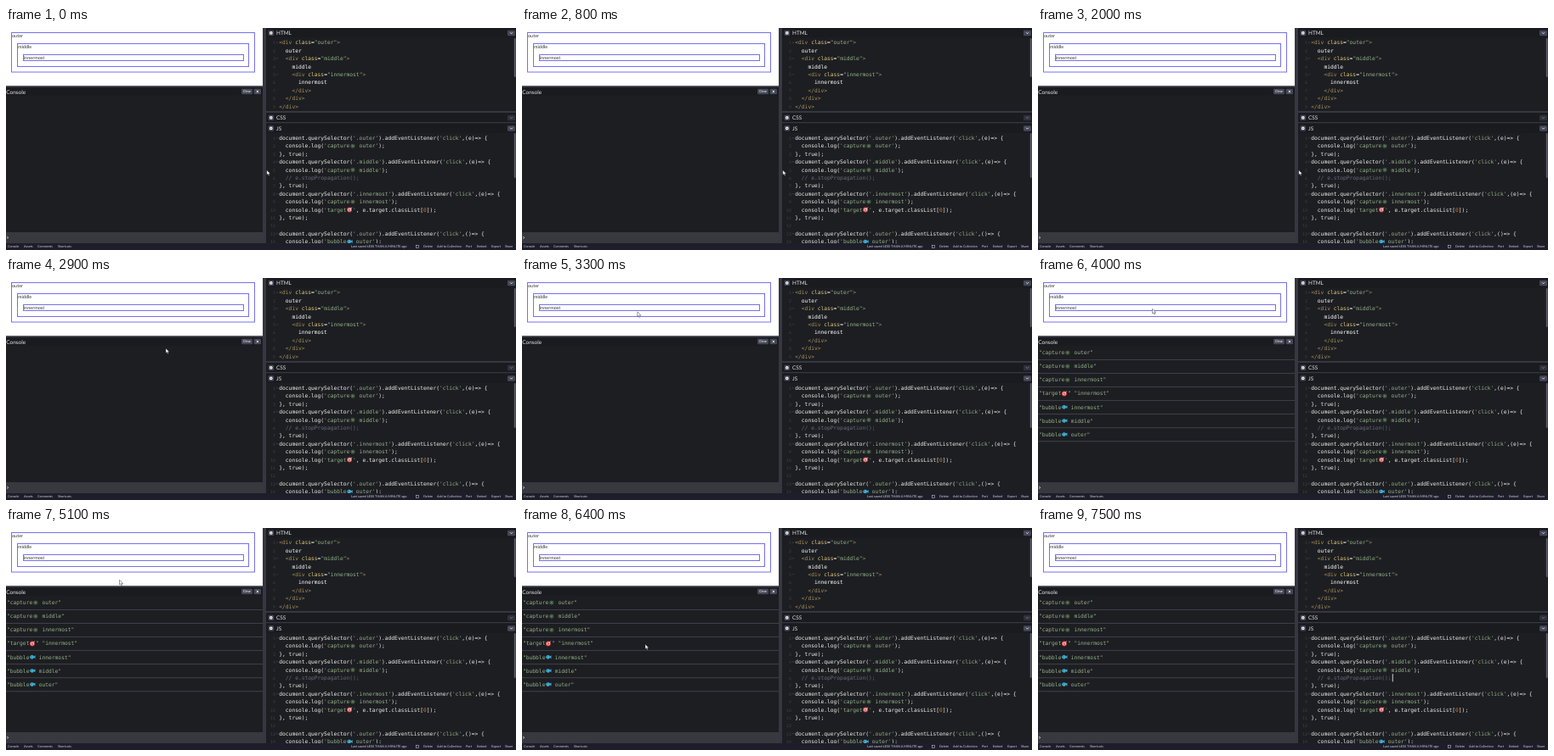
An HTML page that plays this animation: 600x262 px, repeating every 8000 ms.

```html
<!DOCTYPE html>
<html lang="en">
<head>
<meta charset="utf-8">
<title>Event phases</title>
<style>
html, body { margin: 0; width: 100%; height: 100%; overflow: hidden; background: #1d1e22; }
svg { display: block; width: 100%; height: 100%; }
text { white-space: pre; text-rendering: geometricPrecision; font-family: Lato, sans-serif; }
.mono { font: 6.28px "DejaVu Sans Mono", monospace; }
</style>
</head>
<body>
<svg id="stage" viewBox="0 0 600 262"></svg>
<script>
const CH = 3.78, LINE = 9.4, LOOP = 8000;
const BAR = '#363741', BUTTON = '#444857', GREEN = '#96b38a';

const rect = (x, y, w, h, fill, extra = '') =>
  `<rect x="${x}" y="${y}" width="${w}" height="${h}" fill="${fill}" ${extra}/>`;
const label = (x, y, s, size, fill, extra = '') =>
  `<text x="${x}" y="${y}" font-size="${size}" fill="${fill}" ${extra}>${s}</text>`;
const esc = s => s.replace(/&/g, '&amp;').replace(/</g, '&lt;').replace(/>/g, '&gt;');

// Icons two characters wide, keyed by their placeholder.
const icons = {
  '@': '<path d="M3.5-5 4.4-4 5.9-4.3 5.6-2.9 6.6-2 5.5-1.3 5.7.1 4.3-.2 3.5.9 2.7-.2 1.3.1 1.5-1.3.4-2 1.4-2.9 1.1-4.3 2.6-4z" fill="#43583f"/><circle cx="3.5" cy="-2.2" r="1" fill="#67805c"/>',
  '#': '<circle cx="3.4" cy="-2" r="3" fill="#d93a3c"/><circle cx="3.4" cy="-2" r="2" fill="#f0dcd8"/><circle cx="3.4" cy="-2" r="1.2" fill="#d93a3c"/><path d="M3.4-2 6.2-4.9" stroke="#e8eef2" stroke-width=".8"/>',
  '~': '<path d="M.3-2.2Q1.4-4.6 3.6-4.4 4.8-4.1 5.4-3L7-4.2V-.2L5.4-1.4Q4.6.2 3.2.3 1.2.2.3-2.2z" fill="#3fa9cf"/><circle cx="1.8" cy="-2.5" r=".45" fill="#17303c"/>'
};

const TOKEN = /(\/\/.*)|('[^']*'|"[^"]*")|(<\/?div|>$)|(\bclass\b)|(\d)/g;
const COLORS = ['#686b7c', GREEN, '#a7925a', '#ddca7e', '#d0782a'];

function code(x, y, src, plain) {
  const wide = src.replace(/[@#~]/g, '\u00a0\u00a0');
  const span = (s, fill) => s && `<tspan fill="${fill}">${esc(s)}</tspan>`;
  let at = 0, spans = '', icon = '';
  for (const m of wide.matchAll(TOKEN)) {
    spans += span(wide.slice(at, m.index), plain);
    spans += span(m[0], COLORS[m.slice(1).findIndex(Boolean)]);
    at = m.index + m[0].length;
  }
  spans += span(wide.slice(at), plain);
  const i = src.search(/[@#~]/);
  if (i >= 0) icon = `<g transform="translate(${x + i * CH} ${y})">${icons[src[i]]}</g>`;
  return `<text class="mono" x="${x}" y="${y}">${spans}</text>${icon}`;
}

function editor(y, lines, plain) {
  return lines.map((s, i) => {
    const by = y + i * LINE;
    const fold = /^\s*<div|\{$/.test(s)
      ? `<path d="M318 ${by - 2.6}h1.8l-.9 1.2z" fill="#55575f"/>` : '';
    return label(316.8, by, i + 1, 5, '#414249', 'text-anchor="end"') + fold + code(321.3, by, s, plain);
  }).join('');
}

const scrollbar = (y, h) => rect(597.8, y, 1.8, h, '#5f616d', 'rx=".9"');

function header(y, name, button = BUTTON, mark = '#fff') {
  return rect(306, y, 294, 11.5, '#1a1b1f') +
    rect(308.6, y + 2.8, 6.4, 6.2, BUTTON, 'rx="1"') +
    `<circle cx="311.8" cy="${y + 5.9}" r="1.2" fill="none" stroke="#fff" stroke-width="1.2"/>` +
    label(318, y + 8.1, name, 6.4, '#e3e4e8') +
    rect(590, y + 2.7, 9, 6.6, button, 'rx="1"') +
    `<path d="M593 ${y + 5.2}l1.5 1.5 1.5-1.5" fill="none" stroke="${mark}" stroke-width=".8"/>`;
}

const html = [
  '<div class="outer">', '  outer', '  <div class="middle">', '    middle',
  '    <div class="innermost">', '      innermost', '    </div>', '  </div>', '</div>'
];

const listen = (name, arg) => `document.querySelector('.${name}').addEventListener('click',(${arg})=> {`;
const js = [
  listen('outer', 'e'), "  console.log('capture@ outer');", '}, true);',
  listen('middle', 'e'), "  console.log('capture@ middle');", '  // e.stopPropagation();', '}, true);',
  listen('innermost', 'e'), "  console.log('capture@ innermost');",
  "  console.log('target#', e.target.classList[0]);", '}, true);', '',
  listen('outer', ''), "  console.log('bubble~ outer');"
];

const logs = [
  '"capture@ outer"', '"capture@ middle"', '"capture@ innermost"', '"target#" "innermost"',
  '"bubble~ innermost"', '"bubble~ middle"', '"bubble~ outer"'
];

function preview() {
  const box = (x, y, w, h) => rect(x, y, w, h, 'none', 'stroke="#7570ee" stroke-width="1"');
  return rect(0, 0, 302, 68.5, '#fff') +
    box(6.5, 5.5, 286, 46.5) + box(13.5, 18.5, 272, 27) + box(20.5, 31.5, 259, 7) +
    label(7, 11.2, 'outer', 5.5, '#333') + label(14, 24.4, 'middle', 5.5, '#333') +
    label(20.8, 37.3, 'innermost', 5.5, '#333');
}

function consolePane() {
  const rows = logs.map((s, i) =>
    code(1, 90.3 + i * 16.05, s, GREEN) + rect(0, 96.1 + i * 16.05, 302, .8, '#484a51')).join('');
  return rect(0, 68.5, 302, 1.5, BAR) + rect(0, 70, 302, 10, '#1a1b1f') +
    label(.2, 77.7, 'Console', 6.5, '#e3e4e8') +
    rect(277, 71.8, 13, 6.4, BUTTON, 'rx="1"') + label(283.5, 76.4, 'Clear', 4, '#fff', 'text-anchor="middle"') +
    rect(291.6, 71.8, 8.4, 6.4, BUTTON, 'rx="1"') +
    '<path d="M294.6 73.8l2.4 2.4m0-2.4l-2.4 2.4" stroke="#fff" stroke-width=".8"/>' +
    `<g id="rows">${rows}</g>` +
    rect(0, 241, 302, 13, '#38393f') +
    '<path d="M1.2 246.2l1.6 1.2-1.6 1.2" fill="none" stroke="#fff" stroke-width=".7"/>';
}

function footer() {
  const items = [
    [2, 'Console'], [21, 'Assets'], [37, 'Comments'], [61, 'Shortcuts'], [491, 'Delete'],
    [507, 'Add to Collection'], [541, 'Port'], [554, 'Embed'], [571, 'Export'], [587, 'Share']
  ];
  return rect(0, 254, 600, 8, '#1d1e2a') +
    items.map(([x, s]) => label(x, 259.3, s, 3.75, '#d4d5dc')).join('') +
    label(406, 259.3, 'Last saved LESS THAN A MINUTE ago', 3.9, '#d4d5dc') +
    rect(482.3, 256.4, 3, 3, 'none', 'stroke="#b9bac4" stroke-width=".6"');
}

const stage = document.getElementById('stage');
stage.innerHTML =
  rect(0, 0, 600, 262, '#1d1e22') + preview() + consolePane() +
  rect(302, 0, 4, 254, BAR) +
  header(0, 'HTML') + editor(19.4, html, '#fff') + scrollbar(12, 46) +
  rect(306, 98, 294, 2, BAR) + header(100, 'CSS', '#2f313b', '#8b8d98') +
  rect(306, 111, 294, 1.5, BAR) + header(112.5, 'JS') + editor(132, js, '#f0f0ea') + scrollbar(124, 53) +
  footer() +
  rect(0, 0, .8, 9.2, '#fff', 'id="caret"') +
  '<path id="mouse" d="M0 0V5.6L1.3 4.5 2.2 6.5 3.2 6 2.3 4.2H4.1z" fill="#fff" stroke="#222" stroke-width=".45"/>';

const rows = document.getElementById('rows');
const caret = document.getElementById('caret');
const mouse = document.getElementById('mouse');

// Pointer path: time, x, y.
const path = [
  [0, 306.8, 167.7], [2300, 306.8, 167.7], [2500, 292, 156], [2900, 188, 83],
  [3100, 147, 51], [3200, 137, 43.5], [3400, 134.6, 36.4], [5000, 134.6, 36.4],
  [5100, 133.5, 61.3], [5400, 133.5, 61.3], [5600, 118, 90], [5900, 96.5, 131.5],
  [6100, 96.5, 131.5], [6200, 101, 132.5], [6400, 145, 137.2], [6500, 358, 154]
];

function pointer(t) {
  const i = path.findIndex(p => p[0] > t);
  if (i < 0) return path[path.length - 1].slice(1);
  const [a, b] = [path[i - 1], path[i]];
  const k = (t - a[0]) / (b[0] - a[0]);
  return [1, 2].map(n => a[n] + (b[n] - a[n]) * k);
}

const show = (el, on) => el.setAttribute('visibility', on ? 'visible' : 'hidden');

function draw(ms) {
  // The screen refreshes ten times a second.
  const t = Math.floor(ms % LOOP / 100) * 100;
  const [x, y] = pointer(t);
  mouse.setAttribute('transform', `translate(${x} ${y})`);
  show(mouse, t < 6600);
  show(rows, t >= 4000);
  show(caret, t >= 7000);
  caret.setAttribute('x', t < 7500 ? 355.6 : 416.8);
  caret.setAttribute('y', t < 7500 ? 181.6 : 172.2);
}

const start = performance.now();
function tick() {
  draw(performance.now() - start);
  requestAnimationFrame(tick);
}
draw(0);
requestAnimationFrame(tick);
</script>
</body>
</html>
```
